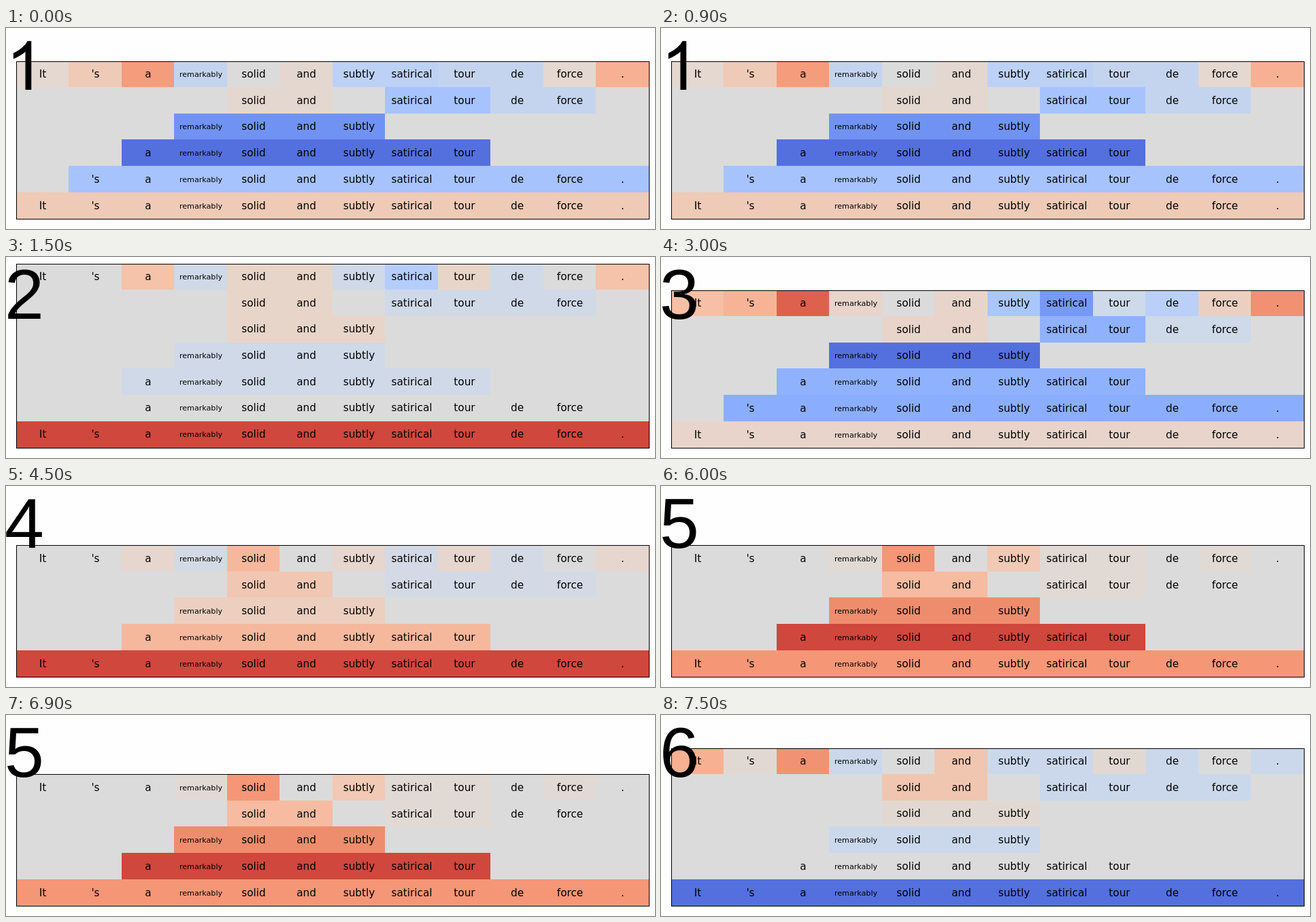
Recreate the animation shown at these times as an HTML page with a canvas. Size 954 by 296 pixels, loop 8000 ms.

```html
<!DOCTYPE html>
<html lang="en">
<head>
<meta charset="utf-8">
<title>Phrase scores</title>
<style>
  html, body { margin: 0; width: 100%; height: 100%; overflow: hidden; background: #fefefe; }
  canvas { display: block; }
</style>
</head>
<body>
<canvas id="stage" width="954" height="296"></canvas>
<script>
const ctx = document.getElementById('stage').getContext('2d');
const words = "It 's a remarkably solid and subtly satirical tour de force .".split(' ');

const LEFT = 15, RIGHT = 945, BOTTOM = 281;
const COL = 77.5, ROW = 38.7;
const STEP = 1500, LOOP = 8000;
const NEUTRAL = 'dbdbdb';

// top: one colour per word ("-" is neutral); phrases: rows of "start-end colour" spans
const scenes = [
  {
    top: 'e4d8d0 efcab7 f59c7d c5d4ee - e4d7cf bdd1f6 bdd1f6 c5d4ee c5d4ee e4d8d0 f7b093',
    phrases: ['4-6 e4d7cf, 7-9 a6c3fe, 9-11 c5d4ee', '3-7 7093f3', '2-9 5470de',
              '1-12 a6c3fe', '0-12 efcab6']
  },
  {
    top: '- - f5c2aa cfd9e8 e8d5c9 e8d5c9 cfd9e8 b5cdfa e8d5c9 cfd9e8 - f5c2aa',
    phrases: ['4-6 e8d5c9, 7-11 cfd9e8', '4-7 e8d5c9', '3-7 cfd9e8', '2-9 cfd9e8',
              '2-11 -', '0-12 d0473d']
  },
  {
    top: 'f6bfa6 f7b396 de614d e8d4cb - e8d4cb aac7fd 7699f6 ced9e9 bad0f8 ebd0c1 f29072',
    phrases: ['4-6 e8d4cb, 7-9 8fb1fe, 9-11 ced9e9', '3-7 5470de', '2-9 8fb1fe',
              '1-12 8badfd', '0-12 e8d4cb']
  },
  {
    top: '- - e6d6cd d3dae6 f6b89d - e6d6cd d3dae6 e6d6cd d3dae6 - e6d6cd',
    phrases: ['4-6 f1c7b3, 7-11 d3dae6', '3-7 eccfbf', '2-9 f6b89d', '0-12 d0473d']
  },
  {
    top: '- - - e1d9d3 f59677 - f1c9b5 e1d9d3 e1d9d3 - e1d9d3 -',
    phrases: ['4-6 f6bba1, 7-9 e1d9d3, 9-11 -', '3-7 ee8d6d', '2-9 d0473d', '0-12 f59677']
  },
  {
    top: 'f7b092 e1d9d1 f29274 cbd8ec - f1c6b0 cbd8ec cbd8ec e1d9d1 cbd8ec - cbd8ec',
    phrases: ['4-6 f1c6b0, 7-11 cbd8ec', '4-7 e1d9d1', '3-7 cbd8ec', '2-9 -', '0-12 5470de']
  }
];

const colour = code => '#' + (code === '-' ? NEUTRAL : code);
const columnX = i => Math.floor(LEFT + COL * i);

function parseSpans(row) {
  return row.split(', ').map(span => {
    const [range, code] = span.split(' ');
    const [start, end] = range.split('-').map(Number);
    return { start, end, code };
  });
}

function drawSpan({ start, end, code }, top, bottom, middle) {
  ctx.fillStyle = colour(code);
  ctx.fillRect(columnX(start), top, columnX(end) - columnX(start), bottom - top);
  ctx.fillStyle = '#000';
  ctx.textAlign = 'center';
  for (let i = start; i < end; i++) {
    const small = words[i].length > 9;
    ctx.font = `${small ? 11.11 : 15.28}px "DejaVu Sans", sans-serif`;
    ctx.fillText(words[i], LEFT + 0.25 + COL * (i + 0.5), middle + (small ? 4 : 5));
  }
}

// A plain one: stem and flag, without a foot
const one = new Path2D('M763 0H583V1147Q518 1085 412 1023T223 930V1104Q374 1175 487 1276T647 1472H763Z');

function drawNumber(n) {
  ctx.fillStyle = '#000';
  if (n === 1) {
    ctx.save();
    ctx.translate(0, 91);
    ctx.scale(100 / 2048, -100 / 2048);
    ctx.fill(one);
    ctx.restore();
    return;
  }
  ctx.textAlign = 'left';
  ctx.font = '104px "Liberation Sans", Arial, sans-serif';
  ctx.fillText(n, -2, 91);
}

function drawScene(index) {
  const { top, phrases } = scenes[index];
  const singles = top.split(' ').map((code, i) => ({ start: i, end: i + 1, code }));
  const rows = [singles, ...phrases.map(parseSpans)];
  const count = rows.length;
  const rowY = r => BOTTOM - ROW * (count - r);
  const textShift = [0, 0.1, 0.5][count - 5];
  const boxTop = Math.round(rowY(0) - 0.1);

  ctx.fillStyle = '#fefefe';
  ctx.fillRect(0, 0, 954, 296);
  ctx.fillStyle = colour('-');
  ctx.fillRect(LEFT, boxTop, RIGHT - LEFT, BOTTOM - boxTop);
  rows.forEach((spans, r) => {
    const middle = Math.round(rowY(r + 0.5) - textShift);
    for (const span of spans) {
      drawSpan(span, Math.max(boxTop, Math.floor(rowY(r))), Math.floor(rowY(r + 1)), middle);
    }
  });
  ctx.strokeStyle = '#000';
  ctx.lineWidth = 1;
  ctx.strokeRect(LEFT + 0.5, boxTop + 0.5, RIGHT - LEFT, BOTTOM - boxTop);
  drawNumber(index + 1);
}

function tick() {
  drawScene(Math.floor(performance.now() % LOOP / STEP));
  requestAnimationFrame(tick);
}
tick();
</script>
</body>
</html>
```
